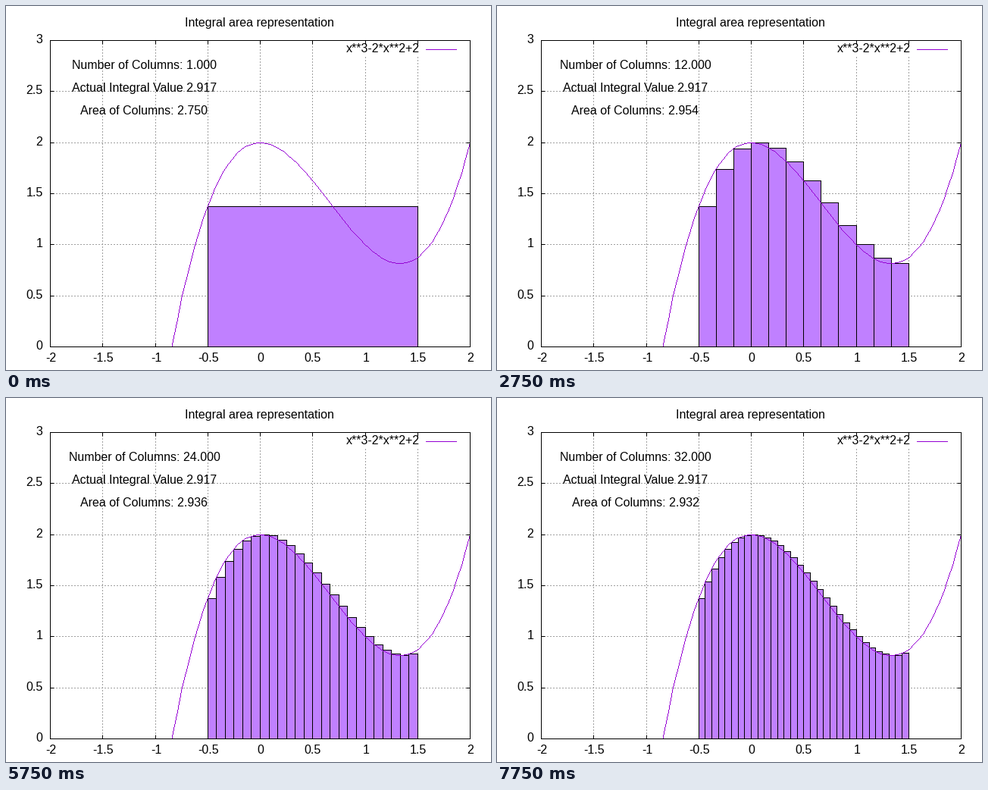
Recreate the animation shown at these times as a matplotlib script. Size 640 by 480 pixels, loop 8 s.

```python
import numpy as np
import matplotlib.pyplot as plt
from matplotlib.animation import FuncAnimation
from matplotlib.collections import LineCollection
from matplotlib.patches import PathPatch
from matplotlib.path import Path

W, H, DPI = 640, 480, 80
PX = 72 / DPI  # one pixel in points
LEFT, RIGHT, TOP, BOTTOM = 58, 612, 45, 449
A, B = -0.5, 1.5
FRAMES, STEP_MS = 32, 250
TIC = 5
KEY_LEFT, KEY_BOTTOM = 440, 67
CURVE, FILL, GRID = "#9400d3", "#c080ff", "#a0a0a0"

plt.rcParams["font.family"] = "Liberation Sans"


def f(x):
    return x**3 - 2 * x**2 + 2


def integral(x):
    return x**4 / 4 - 2 * x**3 / 3 + 2 * x


def px(x):
    return np.floor(LEFT + (x + 2) * (RIGHT - LEFT) / 4 + 0.5)


def py(y):
    return H - 1 - np.floor(H - 1 - BOTTOM + y * (BOTTOM - TOP) / 3 + 0.5)


fig = plt.figure(figsize=(W / DPI, H / DPI), dpi=DPI, facecolor="white")
ax = fig.add_axes([0, 0, 1, 1])
ax.set_xlim(-0.5, W - 0.5)  # integer coordinates are pixel centres
ax.set_ylim(H - 0.5, -0.5)
ax.axis("off")


def lines(segments, color, zorder, **style):
    group = LineCollection(segments, colors=color, linewidths=PX,
                           zorder=zorder, **style)
    group.set_snap(False)
    ax.add_collection(group)


def rects_path(boxes):
    return Path.make_compound_path(*[
        Path([(x0, y0), (x1, y0), (x1, y1), (x0, y1), (x0, y0)], closed=True)
        for x0, y0, x1, y1 in boxes])


def rects(boxes, zorder, **style):
    patch = PathPatch(rects_path(boxes), antialiased=False, snap=False,
                      zorder=zorder, **style)
    return ax.add_patch(patch)


def text(x, baseline, s, ha="center"):
    return ax.text(x, baseline - 0.5, s, ha=ha, va="baseline",
                   fontsize=16 * PX, color="black", zorder=6)


def draw_axes():
    grid, tics = [], []
    for v in np.arange(-2, 2.1, 0.5):
        x = px(v)
        tics += [[(x, BOTTOM + 0.5), (x, BOTTOM - TIC)],
                 [(x, TOP - 0.5), (x, TOP + TIC)]]
        if abs(v) < 2:
            top = KEY_BOTTOM if x > KEY_LEFT else TOP
            grid.append([(x, top - 0.5), (x, BOTTOM)])
        text(x + 0.5, 469, f"{v:g}")
    for v in np.arange(0, 3.1, 0.5):
        y = py(v)
        tics += [[(LEFT - 0.5, y), (LEFT + TIC, y)],
                 [(RIGHT + 0.5, y), (RIGHT - TIC, y)]]
        if 0 < v < 3:
            grid.append([(LEFT - 0.5, y), (RIGHT, y)])
        text(48, y + 4, f"{v:g}", "right")
    lines(grid, GRID, 1, linestyles=[(0, (2, 2))])
    lines(tics, "black", 2)
    rects([(LEFT, TOP, RIGHT, BOTTOM)], 5, facecolor="none",
          edgecolor="black", linewidth=PX)


def pixel_line(p, q):
    """Bresenham pixels, stepping upwards along the longer axis."""
    major = np.argmax(abs(q - p))
    if p[major] > q[major]:
        p, q = q, p
    d = q - p
    n = d[major]
    for k in range(n + 1):
        yield tuple(p + np.sign(d) * ((2 * abs(d) * k + n) // (2 * n)))


def draw_curve():
    xs = np.linspace(-2, 2, 100)
    pts = np.column_stack([px(xs), py(f(xs))]).astype(int)
    cells = {c for p, q in zip(pts[:-1], pts[1:]) for c in pixel_line(p, q)
             if TOP <= c[1] <= BOTTOM}
    rects([(x - 0.5, y - 0.5, x + 0.5, y + 0.5) for x, y in sorted(cells)],
          4, facecolor=CURVE, edgecolor="none", linewidth=0)


draw_axes()
draw_curve()
text(334, 27, "Integral area representation")
text(545, 61, "x**3-2*x**2+2", "right")
lines([[(553.5, 57), (594.5, 57)]], CURVE, 4)

count_label = text(182, 83, "")
text(182, 113, f"Actual Integral Value {integral(B) - integral(A):.3f}")
area_label = text(182, 143, "")
bars = rects([(LEFT, TOP, RIGHT, BOTTOM)], 3, facecolor=FILL,
             edgecolor="black", linewidth=PX)


def update(i):
    n = i + 1
    edges = np.linspace(A, B, n + 1)
    heights = f(edges[:-1])
    xs = px(edges)
    bars.set_path(rects_path([(x0, py(h), x1, BOTTOM) for x0, x1, h
                              in zip(xs[:-1], xs[1:], heights)]))
    count_label.set_text(f"Number of Columns: {n:.3f}")
    area_label.set_text(f"Area of Columns: {heights.sum() * (B - A) / n:.3f}")
    return bars, count_label, area_label


anim = FuncAnimation(fig, update, frames=FRAMES, interval=STEP_MS,
                     repeat=True, repeat_delay=0, blit=False)
plt.show()
```
